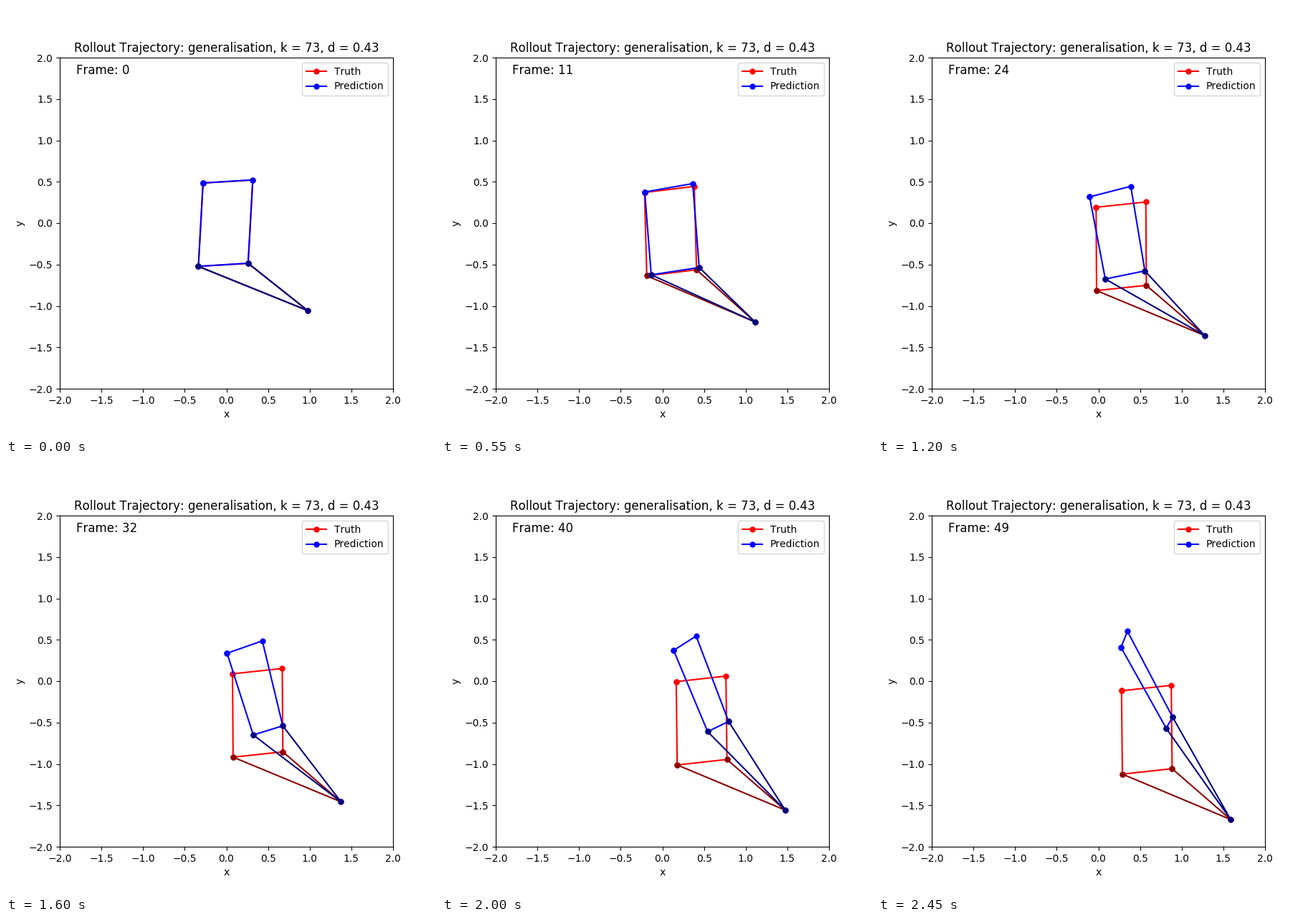
Recreate the animation shown at these times as a matplotlib script. Size 600x600 px, loop 2.5 s.

```python
import numpy as np
import matplotlib.pyplot as plt
from matplotlib.animation import FuncAnimation

FRAMES = 50
INTERVAL = 50
ORIGIN = np.array([307.5, 303.0])     # stage position of (0, 0)
UNIT = np.array([116.25, -115.5])     # pixels per data unit

# Whole-pixel kerning sets the text slightly wider
plt.rcParams["text.kerning_factor"] = 6


def bump(n, centre, width):
    return np.exp(-((n - centre) / width) ** 2)


def corners(centre, up, right, twist=np.zeros(2)):
    """Box corners in the order TL, TR, BR, BL; twist skews top against bottom."""
    top, bottom = (right + twist / 2) / 2, (right - twist / 2) / 2
    return np.array([centre + up / 2 - top, centre + up / 2 + top,
                     centre - up / 2 + bottom, centre - up / 2 - bottom])


def tip(n):
    """The driven point moves at constant speed."""
    return np.array([421.0, 425.0]) + 1.449 * n


def true_pose(n):
    """Centre and edges of the box trailing the tip, with damped sway and tilt."""
    sway = np.exp(-0.05 * n) * np.sin(0.185 * (5 - n))
    tilt = np.exp(-0.085 * n) * (np.cos(0.233 * n) + 0.365 * np.sin(0.233 * n))
    centre = tip(n) + np.array([-116.7, -124.9]) + sway * np.array([2.6, 3.75])
    up = np.array([-1.2 + 7.7 * tilt, -116.3])
    right = np.array([69.4, -7.6 + 3.3 * tilt])
    return centre, up, right


def truth(n):
    return corners(*true_pose(n))


def prediction(n):
    """The true pose with a growing lift, lean, squeeze and twist."""
    s = n / (FRAMES - 1)
    centre, up, right = true_pose(n)
    lift = 2.03 * 4 * np.logaddexp(0, (n - 15.5) / 4)
    drift = 2.5 * bump(n, 10, 4) - 5 * bump(n, 24, 8)
    lean = np.array([-61.8 * s ** 1.57, 0])
    squeeze = np.array([-60.5 * s ** 2.15, -11.5 * s])
    twist = np.array([8 * bump(n, 32, 7), -7 * s])
    return corners(centre + np.array([drift, -lift]), up + lean,
                   right + squeeze, twist)


def to_data(points):
    return (np.array(points) - ORIGIN) / UNIT


fig, ax = plt.subplots(figsize=(6, 6), dpi=100)
ax.set(xlim=(-2, 2), ylim=(-2, 2), xlabel="x", ylabel="y",
       title="Rollout Trajectory: generalisation, k = 73, d = 0.43")


def add_shape(label, color, dark):
    box, = ax.plot([], [], "o-", color=color, markersize=5, label=label)
    arms, = ax.plot([], [], "o-", color=dark, markersize=5)
    return box, arms


shapes = [(truth, *add_shape("Truth", "red", "darkred")),
          (prediction, *add_shape("Prediction", "blue", "navy"))]
ax.legend(loc="upper right")
counter = ax.text(0.05, 0.95, "", fontsize=12, transform=ax.transAxes)


def update(n):
    for corners_at, box, arms in shapes:
        tl, tr, br, bl = corners_at(n)
        box.set_data(*to_data([tl, tr, br, bl, tl]).T)
        arms.set_data(*to_data([bl, tip(n), br]).T)
    counter.set_text(f"Frame: {n}")
    return [counter] + [line for _, *lines in shapes for line in lines]


anim = FuncAnimation(fig, update, frames=FRAMES, interval=INTERVAL,
                     repeat=True, repeat_delay=0)
plt.show()
```
